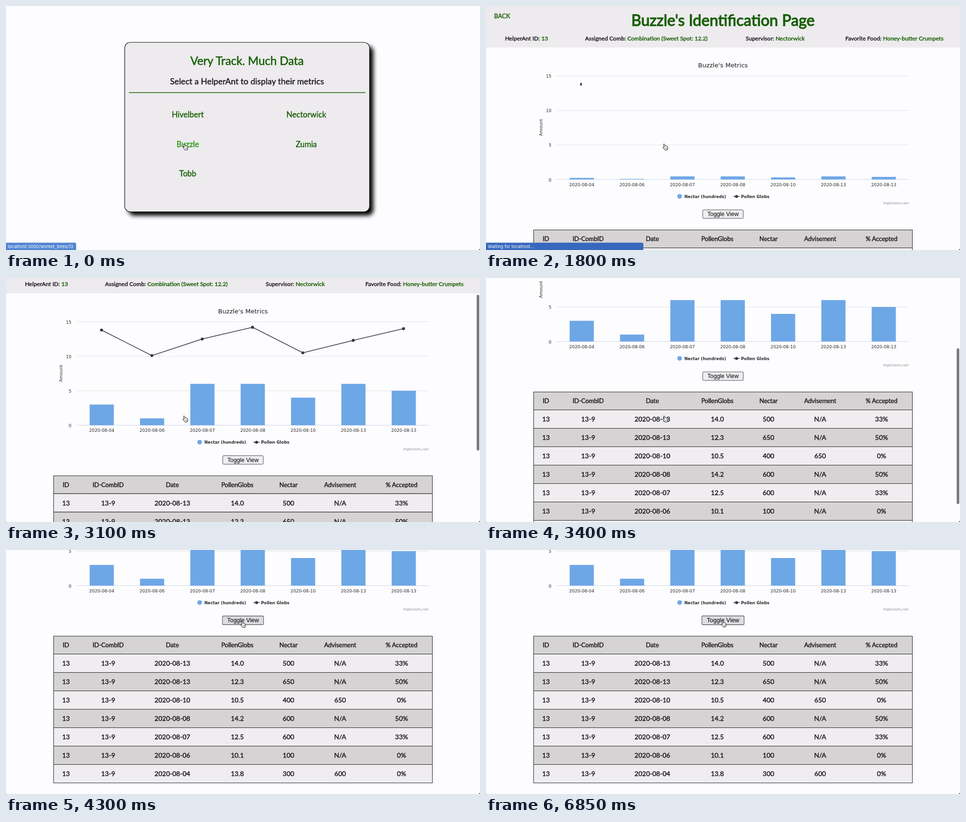
Animation, 1000 px wide and 517 px high, one loop 6950 ms. Source, as an HTML page:

```html
<!DOCTYPE html>
<html lang="en">
<head>
<meta charset="utf-8">
<title>Metrics</title>
<style>
html, body { margin: 0; width: 100%; height: 100%; overflow: hidden; background: #fdfcfe; }
svg { display: block; width: 1000px; height: 517px; }
text { white-space: pre; }
.geo { font-family: Lato, sans-serif; stroke: currentColor; stroke-width: .45px; }
.chart { font-family: "DejaVu Sans", sans-serif; }
.ui { font-family: "Liberation Sans", Arial, sans-serif; }
.tip { font-family: Inter, sans-serif; }
</style>
</head>
<body>
<svg id="stage" viewBox="0 0 1000 517" xmlns="http://www.w3.org/2000/svg"></svg>
<script>
const LOOP = 6950, STEP = 50, MAX_SCROLL = 292;
const GREEN = '#185f05', HOVER = '#2f9a14', INK = '#1b191c';
const LIGHT = '#efedf0', GREY = '#d5d3d4', PANEL = '#edebee';
const BEE = 'Buzzle', BOSS = 'Nectorwick', ROLE = 'HelperAnt';

const clamp = (v, a = 0, b = 1) => Math.min(b, Math.max(a, v));
const phase = (t, start, end) => clamp((t - start) / (end - start));
const sine = p => (1 - Math.cos(Math.PI * p)) / 2;
const mix = (a, b, p) => a + (b - a) * p;

const label = (x, y, str, size, { font = 'geo', fill = INK, anchor = 'middle', more = '' } = {}) =>
  `<text x="${x}" y="${y}" class="${font}" font-size="${size}" fill="${fill}" color="${fill}" text-anchor="${anchor}" ${more}>${str}</text>`;
const rect = (x, y, w, h, fill, more = '') =>
  `<rect x="${x}" y="${y}" width="${w}" height="${h}" fill="${fill}" ${more}/>`;
const line = (x1, y1, x2, y2, stroke, w = 1) =>
  `<path d="M${x1} ${y1}L${x2} ${y2}" stroke="${stroke}" stroke-width="${w}" fill="none"/>`;
const group = (id, body, more = '') => `<g id="${id}" ${more}>${body}</g>`;

// Selection card
function card() {
  const box = 'x="250.5" y="77" width="516.5" height="359" rx="12"';
  const names = [['Hivelbert', 383.5, 236], [BOSS, 633.5, 236], [BEE, 383.5, 298.5],
    ['Zumia', 633.5, 298.5], ['Tobb', 383.5, 361]];
  return `<rect ${box} fill="#000" transform="translate(8 8)" filter="url(#blur)"/>
    <rect ${box} fill="${PANEL}" stroke="#111" stroke-width="1.2"/>` +
    label(508.5, 125, 'Very Track. Much Data', 24.2, { fill: GREEN, more: 'style="stroke-width:.6px"' }) +
    label(508.5, 165.5, `Select a ${ROLE} to display their metrics`, 17.7) +
    line(259, 183.5, 758.5, 183.5, GREEN, 1.6) +
    names.map(([n, x, y]) => label(x, y, n, 16.6, { fill: n === BEE ? HOVER : GREEN })).join('');
}

// Profile header
function header() {
  const facts = [[40, `${ROLE} ID:`, '13'], [209, 'Assigned Comb:', 'Combination (Sweet Spot: 12.2)'],
    [548, 'Supervisor:', BOSS], [758, 'Favorite Food:', 'Honey-butter Crumpets']];
  return rect(0, 0, 1000, 88, PANEL) +
    label(17, 26, 'BACK', 13, { fill: GREEN, anchor: 'start' }) +
    label(500, 42, `${BEE}'s Identification Page`, 32.5, { fill: GREEN, more: 'style="stroke-width:1.3px"' }) +
    facts.map(([x, k, v]) => label(x, 72.5,
      `${k} <tspan fill="${GREEN}" color="${GREEN}">${v}</tspan>`, 12.2, { anchor: 'start' })).join('');
}

// Bar and line chart
function chart() {
  const days = ['04', '06', '07', '08', '10', '13', '13'];
  const nectar = [3, 1, 6, 6, 4, 6, 5];
  const globs = [13.8, 10.1, 12.5, 14.2, 10.5, 12.3, 14];
  const px = i => 202 + i * 106.2, py = v => 367.5 - v * 14.62;
  const opt = { font: 'chart', fill: '#2a2a2a' };
  const bold = { font: 'chart', fill: '#2b2a2d', anchor: 'start', more: 'font-weight="700"' };
  const dot = (x, y) => `<circle cx="${x}" cy="${y}" r="3.1" fill="#37353a"/>`;
  const path = globs.map((v, i) => `${px(i) - .5},${py(v)}`).join(' ');
  return label(500, 130, `${BEE}'s Metrics`, 13.1, { font: 'chart' }) +
    [0, 5, 10, 15].map(v => line(149, py(v), 892, py(v), v ? '#e3e2e4' : '#ccd6eb') +
      label(138, py(v) + 4, v, 9, { ...opt, anchor: 'end' })).join('') +
    label(0, 0, 'Amount', 9.2, { ...opt, more: 'transform="translate(119 257.5) rotate(-90)"' }) +
    group('bars', nectar.map((v, i) => rect(px(i) - 25.5, py(v), 51, v * 14.62, '#6ea7e6')).join('')) +
    group('trend', `<polyline points="${path}" fill="none" stroke="#37353a" stroke-width="1.5"/>` +
      globs.map((v, i) => dot(px(i) - .5, py(v))).join(''), 'clip-path="url(#reveal)"') +
    days.map((d, i) => label(px(i), 381.7, `2020-08-${d}`, 9.1, opt)).join('') +
    '<circle cx="408.5" cy="403.3" r="4.9" fill="#6ea7e6"/>' +
    label(418.5, 406.8, 'Nectar (hundreds)', 8.5, bold) +
    line(522, 403.5, 535, 403.5, '#37353a', 1.5) + dot(528.5, 403.5) +
    label(538, 406.8, 'Pollen Globs', 8.55, bold) +
    label(892, 420, 'Highcharts.com', 6.85, { font: 'chart', fill: '#858486', anchor: 'end' });
}

const rows = [['13', '14.0', 500, 'N/A', '33%'], ['13', '12.3', 650, 'N/A', '50%'],
  ['10', '10.5', 400, 650, '0%'], ['08', '14.2', 600, 'N/A', '50%'], ['07', '12.5', 600, 'N/A', '33%'],
  ['06', '10.1', 100, 'N/A', '0%'], ['04', '13.8', 300, 600, '0%']];

const editButton = y => rect(724, y - 8.7, 102, 17.4, LIGHT, 'rx="2.5" stroke="#161616" stroke-width="1.2"') +
  line(726, y + 8.8, 825, y + 8.8, '#111', 1.5) +
  label(775, y + 4.2, 'Edit Advisement', 12.3, { font: 'ui', fill: '#000' });

function table(x, w, cols, edges, heads, cells) {
  const lines = [heads, ...rows.map(cells)];
  return lines.map((line, r) => {
    const top = edges[r], h = edges[r + 1] - top, mid = top + h / 2;
    return rect(x, top, w, h, r % 2 ? LIGHT : GREY, 'stroke="#222"') +
      line.map((c, i) => c === 'edit' ? editButton(mid - .5)
        : label(cols[i], mid + (r ? 5 : 4.8), c, r ? 14 : 13)).join('');
  }).join('');
}

const fullTable = () => table(100.5, 799, [126.5, 215.5, 351, 488, 596, 705, 834.5],
  Array.from({ length: 9 }, (_, i) => i ? 473.5 + i * 39 : 474.5),
  ['ID', 'ID-CombID', 'Date', 'PollenGlobs', 'Nectar', 'Advisement', '% Accepted'],
  ([d, ...rest]) => ['13', '13-9', `2020-08-${d}`, ...rest]);

const editTable = () => table(124, 752, [205.5, 359, 480, 601.5, 775],
  [474.5, 511, 548.5, 586, 629.5, 667.5, 705, 742, 786],
  ['Date', 'PollenGlobs', 'Nectar', 'Advisement', 'Overrule'],
  ([d, p, n, a]) => [`2020-08-${d}`, p, n, a, a === 'N/A' ? '' : 'edit']);

const toggle = () => rect(-42.8, -9, 85.6, 18, LIGHT, 'id="face" rx="2" stroke="#4a484b"') +
  label(0, 4.2, 'Toggle View', 12.3, { font: 'ui', fill: '#000' });

const bubble = () => '<path id="tipBox"/>' +
  label(4, 513, '', 9.25, { font: 'tip', fill: '#fff', anchor: 'start', more: 'id="tipText"' });

const hand = `<path d="M-4-4.8q-.2-1.3.9-1.4t1.5 1.2l.9 2.9q1-.7 1.8.2q1.1-.6 1.7.4q1.5-.3 1.8 1.2l.5 2.4q.1 1.5-.7 2.8v1.5l-5.3.3-.3-1.1q-2.1-1.2-3.8-3.6q-.5-1.2.4-1.5q.9-.1 2.2 1z"
  fill="#fff" stroke="#111" stroke-width="1" stroke-linejoin="round"/>
  <path d="M-.3 2l.3 2.2M1.6 1.8l.3 2.2M3.4 1.6l.3 2.2" stroke="#111" stroke-width=".7"/>`;
const arrow = `<path d="M-3-6v12l2.8-2.6 1.8 4 2-.9-1.8-3.9h3.8z" fill="#111" stroke="#fff" stroke-width=".9"/>`;

document.getElementById('stage').innerHTML = `<defs>
  <filter id="blur" x="-10%" y="-10%" width="120%" height="120%"><feGaussianBlur stdDeviation="5"/></filter>
  <clipPath id="reveal"><rect id="revealBox" x="140" y="100" width="0" height="300"/></clipPath></defs>` +
  rect(0, 0, 1000, 517, '#fdfcfe') +
  group('home', card()) +
  group('page', header() + chart() + group('toggle', toggle()) +
    group('full', fullTable()) + group('edit', editTable())) +
  rect(993, 0, 5.5, 330, '#7b797c', 'id="thumb" rx="2.7"') +
  group('bubble', bubble()) +
  '<path d="M1000 514.5V517H997.5zM0 515.5V517H1.5z" fill="#222"/>' +
  group('pointer', group('hand', hand) + group('arrow', arrow));

const $ = id => document.getElementById(id);
const set = (id, name, value) => $(id).setAttribute(name, value);
const show = (id, on) => set(id, 'display', on ? 'inline' : 'none');

function scrollAt(t) {
  if (t < 3100) return 55.5 * phase(t, 2950, 3100) ** 2;
  return mix(55.5, MAX_SCROLL, 1 - (1 - phase(t, 3100, 3700)) ** 2);
}

function drawBubble(t) {
  const waiting = t >= 1350, w = waiting ? 332 : 148;
  const p = phase(t, 0, 500);
  const rgb = [[82, 133, 211], [56, 104, 190]];
  set('tipBox', 'd', `M-1 518V501.5H${w - 3}q3 0 3 3V518z`);
  set('tipBox', 'fill', `rgb(${rgb[0].map((c, i) => Math.round(mix(c, rgb[1][i], p)))})`);
  $('tipText').textContent = waiting ? 'Waiting for localhost...' : 'localhost:3000/worker_bees/13';
  set('bubble', 'opacity', 1 - phase(t, 2150, 2400));
}

function draw(t) {
  const loaded = t >= 1600, editing = t >= 4600 && t < 5600;
  const scroll = Math.round(scrollAt(t) * 2) / 2;
  show('home', !loaded);
  show('page', loaded);
  set('page', 'transform', `translate(0 ${-scroll})`);
  show('full', !editing);
  show('edit', editing);

  const grow = sine(phase(t, 1625, 2625));
  set('bars', 'transform', `translate(0 ${367.5 * (1 - grow)}) scale(1 ${grow})`);
  set('revealBox', 'width', 840 * grow);

  const hover = phase(t, 4200, 4500);
  set('toggle', 'transform', `translate(500 441) scale(${1 + .04 * hover})`);
  set('face', 'fill', t >= 4200 ? '#dedcdf' : LIGHT);

  set('thumb', 'y', scroll * .639);
  set('thumb', 'opacity', phase(t, 2900, 3000) * (1 - phase(t, 4100, 4280)));
  drawBubble(t);

  const move = sine(phase(t, 3600, 4200)), nudge = phase(t, 4300, 4450);
  const moving = t > 3600 && t < 4150;
  set('pointer', 'transform', `translate(${mix(378.5, 500, move) + 1.5 * nudge} ${mix(298.5, 157.5, move) - nudge})`);
  show('hand', !moving);
  show('arrow', moving);
}

let origin;
function tick(now) {
  origin ??= now;
  draw(Math.floor((now - origin) % LOOP / STEP) * STEP);
  requestAnimationFrame(tick);
}
draw(0);
requestAnimationFrame(tick);
</script>
</body>
</html>
```
